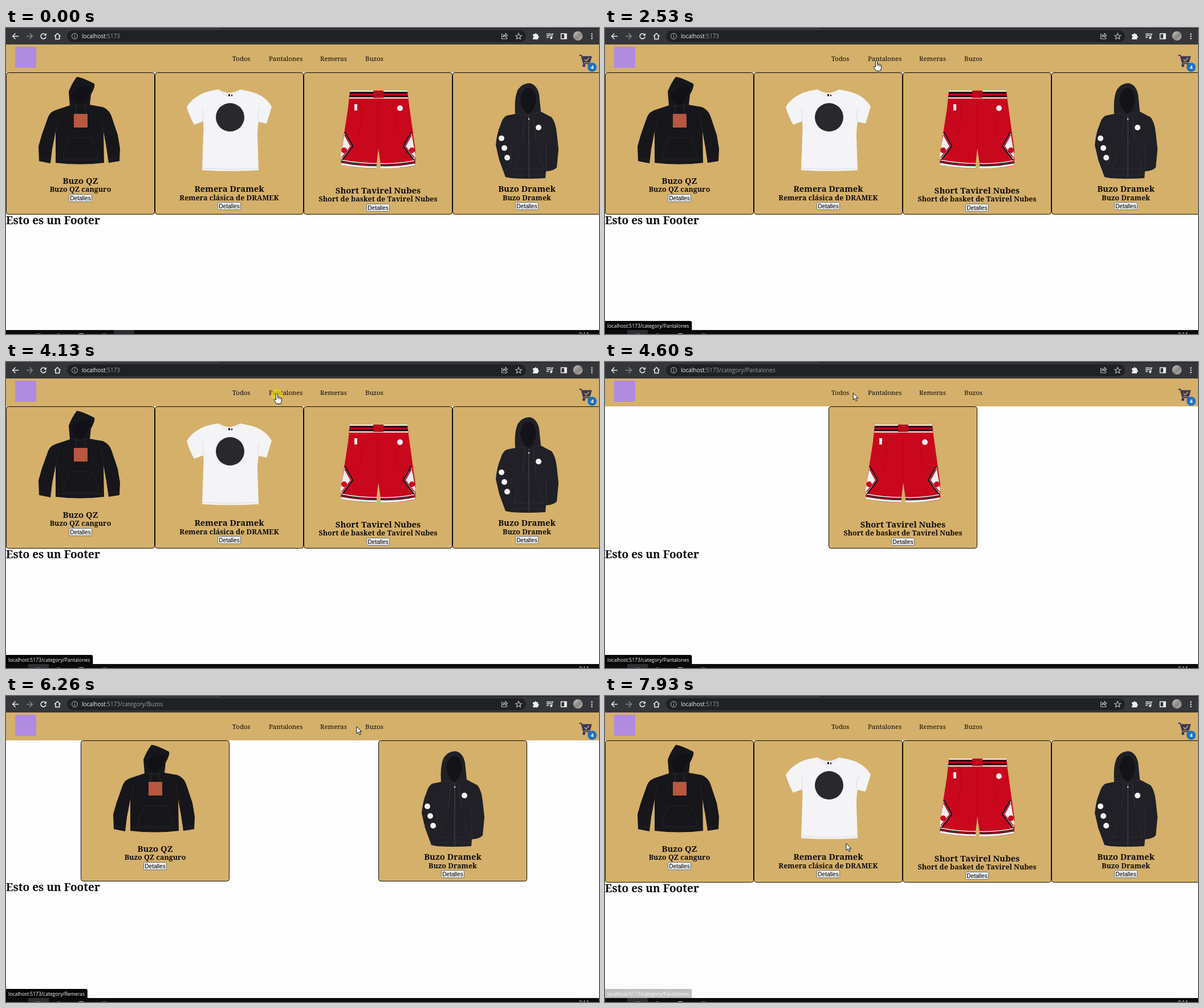
An HTML page with a canvas that plays this animation: 1040x538 px, repeating every 8 s.

```html
<!DOCTYPE html>
<html lang="es">
<head>
<meta charset="utf-8">
<title>Tienda</title>
<style>
html, body { margin: 0; width: 100%; height: 100%; overflow: hidden; background: #fff; }
canvas { display: block; width: 1040px; height: 538px; }
</style>
</head>
<body>
<canvas id="stage" width="1040" height="538"></canvas>
<script>
const ctx = document.getElementById('stage').getContext('2d');
const LOOP = 8000, STEP = 70;
const TAN = '#d4b06a', INK = '#100c0c';
const SERIF = '"Noto Serif", serif', UI = '"Open Sans", sans-serif', SANS = '"Liberation Sans", sans-serif';

function rect(color, x, y, w, h) { ctx.fillStyle = color; ctx.fillRect(x, y, w, h); }
function disc(color, x, y, r) {
  ctx.fillStyle = color; ctx.beginPath(); ctx.arc(x, y, r, 0, 7); ctx.fill();
}
function box(x, y, w, h, r, fill, edge) {
  ctx.beginPath(); ctx.roundRect(x, y, w, h, r);
  if (fill) { ctx.fillStyle = fill; ctx.fill(); }
  if (edge) { ctx.strokeStyle = edge; ctx.lineWidth = 1; ctx.stroke(); }
}
function fill(color, d) { ctx.fillStyle = color; ctx.fill(new Path2D(d)); }
function line(color, width, d) {
  ctx.strokeStyle = color; ctx.lineWidth = width; ctx.stroke(new Path2D(d));
}
function text(str, x, y, font, color = INK, align = 'left') {
  ctx.font = font; ctx.fillStyle = color; ctx.textAlign = align;
  ctx.fillText(str, x, y);
  return ctx.measureText(str).width;
}

// Garments, in card coordinates
function pullover() {
  const seam = '#26252b';
  fill('#17161b', 'M112 136L110 112Q115 98 124 86Q132 86 155 98Q157 103 149 117L147 135L170 139Q181 144 185 155L196 188L200 212L199 234L180 237L176 210L171 182L172 237Q130 242 87 237L87 182L81 213L78 238L58 234L57 208L63 187L74 156Q78 147 88 144Z');
  fill('#121116', 'M116 116Q130 98 150 104Q143 122 134 134Q118 136 116 116Z');
  line(seam, 1, 'M114 134Q128 142 146 134M111 193H150L161 218V229H101V218ZM88 232H171M58 228L78 232M180 231L199 228M88 182L93 155M171 182L167 155');
  line('#2e2d33', 1, 'M124 134L122 156M137 134L140 150');
  rect('#b9573f', 119, 151, 24, 24);
}
function tee() {
  fill('#f4f3f6', 'M112 108Q130 120 149 108Q168 111 180 116Q196 123 205 138L196 168L182 165Q180 176 180 190L182 250Q133 253 83 250L85 190Q86 176 85 164L69 170Q61 156 56 139Q64 124 86 114Q96 110 112 108Z');
  line('#dddbe2', 1, 'M112 109Q130 130 149 109M85 164Q86 152 83 142M181 164Q179 152 183 142M84 247Q133 250 181 247');
  rect('#222', 129, 116, 3, 4);
  rect('#222', 134, 117, 2, 3);
  disc('#29292b', 132, 157, 25);
}
function sidePanel() {
  fill('#f1eeee', 'M72 183L86 208L67 233L65 224Z');
  line('#17151a', 2.5, 'M72 183L86 208L67 233');
  line('#c9071d', 2, 'M72 188L83 208L67 228');
  disc('#c9071d', 71, 215, 5);
}
function shorts() {
  fill('#c9071d', 'M81 110H182L184 128L196 215V242Q165 248 136 246L131 212L127 247Q95 247 65 240L68 205L78 140Z');
  line('#b80519', 1, 'M131 124V210M101 126Q104 160 97 190M161 126Q159 165 166 190');
  line('#f3efef', 2, 'M81 111H182M80 123H183');
  line('#17151a', 3, 'M81 114H182M80 120H183');
  rect('#b90a1d', 122, 110, 18, 13);
  sidePanel();
  ctx.save(); ctx.translate(261, 0); ctx.scale(-1, 1); sidePanel(); ctx.restore();
  line('#f3efef', 9, 'M66 236Q97 242 128 242M135 242Q165 243 195 237');
  line('#17151a', 4, 'M66 235Q97 241 128 241M135 241Q165 242 195 236');
  line('#c9071d', 1.5, 'M66 235Q97 241 128 241M135 241Q165 242 195 236');
  rect('#f1eeee', 89, 134, 5, 11);
  disc('#f1eeee', 169, 141, 5);
}
function zipHoodie() {
  fill('#202026', 'M110 151Q108 122 115 108Q123 97 135 97Q148 99 152 117L155 147L174 157Q181 166 183 185L186 213L183 245Q178 251 164 252L163 264Q132 266 103 264L93 262L82 232L76 206Q78 184 84 171Q88 157 95 154Z');
  fill('#131318', 'M119 125Q123 105 133 105Q145 106 147 126Q145 143 134 151Q121 145 119 125Z');
  line('#2f2f37', 1, 'M110 151Q121 148 134 155Q146 148 155 147M103 205L102 240M164 200V250M116 222L107 248H128M151 222L160 248H139M103 258H163');
  line('#4a4a52', 1, 'M134 153V264');
  line('#33333b', 1, 'M127 155L123 197M142 155L146 197');
  disc('#f3f3f3', 134, 160, 1.2);
  for (const [x, y] of [[151, 175], [86, 194], [91, 211], [96, 228]]) disc('#f3f3f3', x, y, 5);
}

const products = [
  { kind: 'Buzos', draw: pullover, title: 'Buzo QZ', note: 'Buzo QZ canguro', y: 273.5 },
  { kind: 'Remeras', draw: tee, title: 'Remera Dramek', note: 'Remera clásica de DRAMEK', y: 288 },
  { kind: 'Pantalones', draw: shorts, title: 'Short Tavirel Nubes', note: 'Short de basket de Tavirel Nubes', y: 290.5 },
  { kind: 'Buzos', draw: zipHoodie, title: 'Buzo Dramek', note: 'Buzo Dramek', y: 288 }
];
const links = [['Todos', 397, 430], ['Pantalones', 461, 521], ['Remeras', 551, 599], ['Buzos', 630, 662]];

function card(p, x, bottom) {
  ctx.save();
  ctx.translate(x, 0);
  box(0.5, 78.5, 260, bottom - 79, 4, TAN, '#0c0904');
  p.draw();
  text(p.title, 130.5, p.y, 'bold 14.8px ' + SERIF, INK, 'center');
  text(p.note, 130.5, p.y + 14.7, 'bold 12.5px ' + SERIF, INK, 'center');
  const top = Math.floor(p.y + 18.5);
  box(110.5, top + 0.5, 40, 13, 2, '#efefef', '#6f6f6f');
  text('Detalles', 130.5, top + 10.7, '10.15px ' + SANS, '#000', 'center');
  ctx.restore();
}

function browserBar(path) {
  const w = '#eceded', g = '#c2c4c7';
  rect('#35363a', 0, 0, 1040, 29);
  rect('#1b1c1f', 376, 0, 664, 1);
  box(107, 4, 805, 21, 10.5, '#202124');
  line(w, 1.5, 'M22 14.5H12M16.5 9.5L11.7 14.5L16.5 19.5');
  line('#85878a', 1.5, 'M36 14.5H46M41.5 9.5L46.3 14.5L41.5 19.5');
  line(w, 1.6, 'M69 11.5A4.5 4.5 0 1 0 70 15.5M85 14.5L90.3 9.5L95.5 14.5M87 13.5V19.5H93.6V13.5');
  fill(w, 'M71 9V13.5H66.5Z');
  line(g, 1, 'M125.5 14.5A5 5 0 1 0 115.5 14.5A5 5 0 1 0 125.5 14.5M120.5 14V17.5M120.5 11.5V12.8');
  const font = '9.95px ' + UI;
  const width = text('localhost', 133, 18, font, '#f1f3f4');
  text(':5173' + path, 133 + width, 18, font, '#9aa0a6');
  line(g, 1.1, 'M872 11H869.5V19H878.5V16M871.5 16Q872 12 876 12V9.5L879.5 12.7L876 16V13.8Q873 13.8 871.5 16');
  line(g, 1.1, 'M899 9.3L900.5 13L904.3 13.2L901.4 15.6L902.4 19.4L899 17.3L895.6 19.4L896.6 15.6L893.7 13.2L897.5 13Z');
  fill(w, 'M924 11H927A1.8 1.8 0 0 1 930.6 11H933V14A1.8 1.8 0 0 1 933 17.6V20H924V17A1.5 1.5 0 0 0 924 14Z');
  line(w, 1.4, 'M948 10.5H956M948 13.5H956M948 16.5H952M957.5 17V10.5H960');
  disc(w, 956, 17.5, 2);
  line(w, 1.5, 'M973.5 10H983V19H973.5Z');
  rect(w, 979, 10, 4, 9);
  const photo = ctx.createLinearGradient(996, 6, 1010, 22);
  photo.addColorStop(0, '#c3c0bd'); photo.addColorStop(0.55, '#8b8884'); photo.addColorStop(1, '#b7b3ae');
  disc(photo, 1003, 14, 8.3);
  for (const y of [10.5, 14.5, 18.5]) disc(w, 1027.5, y, 1.2);
}

function header() {
  rect(TAN, 0, 29, 1040, 49);
  rect('#b18be0', 16, 33, 37, 37);
  for (const [name, x] of links) text(name, x, 58, '11.3px ' + SERIF);
  const cart = '#3b3656';
  line(cart, 1.8, 'M1005.5 48H1009L1013 62.5H1025');
  fill(cart, 'M1010 49.5H1027.5L1024.5 60.5H1013Z');
  disc(cart, 1013.5, 66, 2.5);
  disc(cart, 1023, 66, 2.5);
  line(TAN, 1.5, 'M1014.5 55L1017.5 58L1022.5 52.5');
  disc('#1b73c3', 1028, 69, 8);
  text('4', 1028, 72, 'bold 9px ' + UI, '#fff', 'center');
}

function taskbar(focusX) {
  rect('#0b0a0d', 0, 531, 1040, 7);
  rect('#2d2c31', focusX, 531, 36, 7);
  line('#5d646c', 1, 'M53 537.5H61M89 537.5H95M169 537.5H176');
  line('#d0d0d0', 1.2, 'M127 538.5Q132 535.5 137 538.5');
  text('9:14', 1005, 542, '8.6px ' + UI, '#eee');
}

function statusBubble(path, alpha) {
  const label = 'localhost:5173' + path, font = '8.6px ' + UI;
  ctx.save();
  ctx.globalAlpha = alpha;
  ctx.font = font;
  box(0, 515, ctx.measureText(label).width + 9, 16, [0, 3, 0, 0], '#050505');
  ctx.globalAlpha = 1;
  text(label, 4, 527, font, '#fff');
  ctx.restore();
}

// Pointer path: time, x, y of the tip
const track = [
  [320, 945, 526], [600, 700, 372], [860, 300, 190], [1080, 64, 88], [1150, 48, 69], [1360, 35, 49],
  [1900, 35, 49], [2180, 230, 62], [2460, 472, 58], [2530, 476, 57], [2600, 474, 57], [2670, 462, 56],
  [3160, 413, 54], [3640, 413, 54], [3990, 475, 55], [4390, 475, 55], [4670, 422, 54], [4810, 422, 54],
  [5230, 547, 54], [5300, 554, 54], [5370, 555, 54], [5860, 640, 54], [6190, 640, 54],
  [6820, 415, 51], [7240, 415, 51], [7450, 464, 56], [7790, 430, 238], [7930, 423, 259]
];
const clicks = [[1430, 1640], [3300, 3440], [4130, 4260], [5300, 5370], [5980, 6190], [7030, 7240]];
const pages = [[0, 'Todos'], [4260, 'Pantalones'], [5370, 'Remeras'], [6190, 'Buzos'], [7240, 'Todos']];
const bursts = [0, 320, 1150, 1900, 2740, 3640, 4460, 5300, 6120, 6960, 7790];
const hovers = [[1220, 'Todos'], [2460, 'Pantalones'], [3020, 'Todos'], [3920, 'Pantalones'],
  [4640, 'Todos'], [4950, 'Pantalones'], [5300, 'Remeras'], [5820, 'Buzos'], [6250, 'Remeras'],
  [6460, 'Pantalones'], [6780, 'Todos'], [7450, 'Pantalones']];

const latest = (list, t) => list.filter(e => e[0] <= t).pop();
const pathOf = name => name === 'Todos' ? '' : '/category/' + name;

function pointerAt(t) {
  const i = track.findIndex(k => k[0] > t);
  if (i < 0) return track[track.length - 1].slice(1);
  const [t0, x0, y0] = track[i - 1], [t1, x1, y1] = track[i], u = (t - t0) / (t1 - t0);
  return [x0 + (x1 - x0) * u, y0 + (y1 - y0) * u];
}

function pointer(t) {
  const [x, y] = pointerAt(t);
  const onLink = (x > 14 && x < 54 && y > 33 && y < 71) ||
    (y > 44 && y < 64 && links.some(([, a, b]) => x >= a && x <= b));
  ctx.save();
  ctx.translate(x, y);
  if (clicks.some(([a, b]) => t >= a && t < b)) disc('rgba(232,212,14,.68)', 0, 2, 10);
  const shape = onLink
    ? 'M-1.5 1.5Q0 -.5 1.5 1.5V6.5Q3 5.5 4 7Q5.5 6.3 6.3 7.8Q8.6 7.5 8.6 10V13L6.8 18.5H-.7L-4.4 12.5Q-5.2 10.3 -3 10.5L-1.5 12Z'
    : 'M0 0V12.3L2.9 9.7L5 14.5L7 13.6L5 9H8.7Z';
  fill('#fff', shape);
  line('#111', 1, shape);
  if (onLink) line('#111', 0.8, 'M1.5 6.5V10M4 7V10.5M6.3 8V11');
  ctx.restore();
}

function render(now) {
  const time = now % LOOP;
  const start = bursts.filter(b => b <= time).pop();
  const t = start + Math.floor((time - start) / STEP) * STEP;
  const page = latest(pages, t)[1], hover = latest(hovers, t);
  const shown = products.filter(p => page === 'Todos' || p.kind === page);
  const bottom = shown.some(p => p.kind === 'Pantalones') ? 328 : 326;
  const slot = 1044 / shown.length;

  rect('#fefefe', 0, 0, 1040, 538);
  browserBar(pathOf(page));
  header();
  shown.forEach((p, i) => card(p, Math.round(slot * (i + 0.5) - 130.5), bottom));
  text('Esto es un Footer', 0, bottom + 17, 'bold 19.1px ' + SERIF);
  taskbar(t < 1500 ? 189 : 39);
  if (hover) statusBubble(pathOf(hover[1]), t < 7790 ? 1 : 0.75 - (t - 7790) / 280);
  if (t >= 320) pointer(t);
  requestAnimationFrame(render);
}
requestAnimationFrame(render);
</script>
</body>
</html>
```
